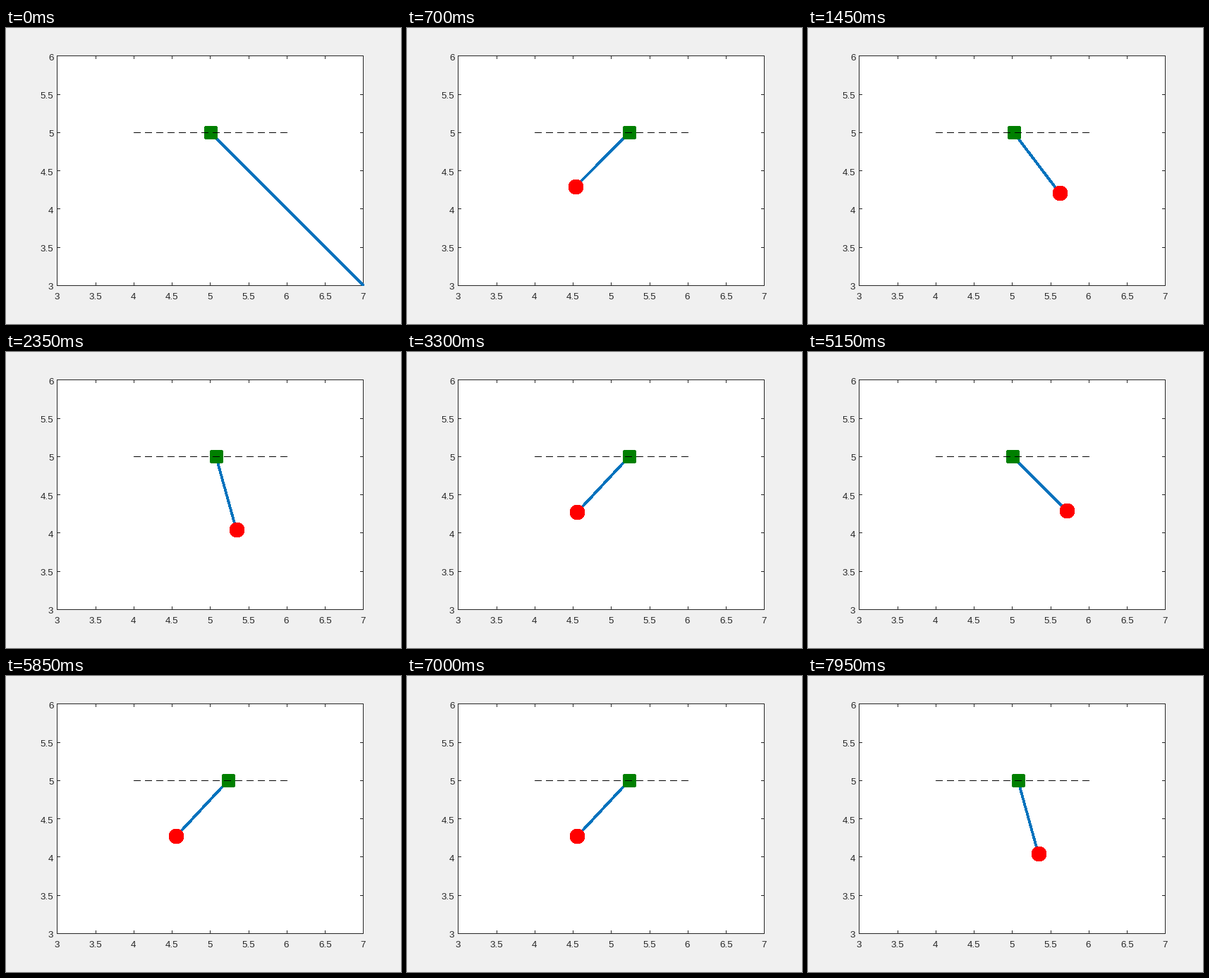
A matplotlib script that plays this animation: 560 by 420 pixels, repeating every 8 s.

```python
import numpy as np
import matplotlib.pyplot as plt
from matplotlib.animation import FuncAnimation
from matplotlib.patches import Circle, Polygon, Rectangle

W, H, DPI = 560, 420, 100
FRAMES, INTERVAL = 160, 50
PX = 72 / DPI                      # one pixel in points
UNIT = 108.5                       # pixels per data unit
LEFT, BOTTOM = 72.8, 365.4         # pixel position of data point (3, 3)
INK = "#262626"
PEN = 2.67

# Pendulum on a free cart, released at rest
MASS_RATIO = 6.0                   # (cart + bob) / bob
START = np.pi / 4
PERIOD = 25.5                      # frames per swing

K = np.sin(START / 2)
PHI = np.linspace(0, 14 * np.pi, 14001)


def angle_at(phi):
    return 2 * np.arcsin(K * np.cos(phi))


rate = np.sqrt((1 - np.cos(angle_at(PHI)) ** 2 / MASS_RATIO)
               / (1 - (K * np.cos(PHI)) ** 2))
clock = np.concatenate(([0], np.cumsum((rate[1:] + rate[:-1]) / 2)))
clock *= 7 * PERIOD / clock[-1]


def to_px(x, y):
    return LEFT + (x - 3) * UNIT, BOTTOM - (y - 3) * UNIT


def marker_px(x, y):
    """Markers sit on whole pixels."""
    px, py = to_px(x, y)
    return np.floor(px + 0.5) + 0.5, np.floor(py) + 0.5


def pose(n):
    theta = angle_at(np.interp(n, clock, PHI))
    cart = 5 + (np.sin(START) - np.sin(theta)) / MASS_RATIO
    return cart, cart + np.sin(theta), 5 - np.cos(theta)


def cut_square(cx, cy, a=7.5, b=9.5):
    pts = [(-a, -b), (a, -b), (b, -a), (b, a),
           (a, b), (-a, b), (-b, a), (-b, -a)]
    return np.array(pts) + (cx, cy)


plt.rcParams["font.family"] = "Liberation Sans"
fig = plt.figure(figsize=(W / DPI, H / DPI), dpi=DPI, facecolor="#f0f0f0")
ax = fig.add_axes([0, 0, 1, 1])
ax.set_xlim(0, W)
ax.set_ylim(H, 0)
ax.axis("off")

X0, X1, Y0, Y1 = 72.5, 506.5, 39.5, 365.5


def stroke(xs, ys, **kw):
    style = dict(color=INK, lw=PX, solid_capstyle="butt", snap=False,
                 zorder=2)
    style.update(kw)
    return ax.plot(xs, ys, **style)[0]


def label(x, y, value, align):
    ax.text(x, y, f"{value:g}", ha=align, va="baseline", color=INK,
            fontsize=13.33 * PX)


ax.add_patch(Rectangle((72, 39), 435, 327, fc="white", ec="none", zorder=0))
stroke([X0, X1, X1, X0, X0], [Y0, Y0, Y1, Y1, Y0],
       solid_joinstyle="miter")

for v in np.arange(3, 7.1, 0.5):
    raw = to_px(v, 3)[0]
    x = np.floor(raw) + 0.5
    stroke([x, x], [Y1, Y1 - 4.5])
    stroke([x, x], [Y0, Y0 + 4.5])
    label(np.round(raw) - 0.5, 385, v, "center")

for v in np.arange(3, 6.1, 0.5):
    raw = to_px(3, v)[1]
    y = np.floor(raw) + 0.5
    stroke([X0, X0 + 4.5], [y, y])
    stroke([X1, X1 - 4.5], [y, y])
    label(67.5, np.round(raw) + 6, v, "right")

rod = stroke([], [], color="#0072bd", lw=PEN * PX, antialiased=False,
             zorder=3)
rod.set_clip_path(Rectangle((72, 39), 436, 327, transform=ax.transData))
bob = Circle((0, 0), 10.5, fc="red", ec="none", zorder=4)
cart_box = Polygon(cut_square(0, 0), fc="#008000", ec="none", zorder=4)
for part in (bob, cart_box):
    part.set(snap=False, antialiased=False)
    ax.add_patch(part)

# Rail, drawn over the cart
for i in range(14):
    stroke([181 + 16 * i, 191 + 16 * i], [148.5, 148.5], color="black",
           zorder=5)


def draw(n):
    if n == 0:
        cart, bx, by = 5, 7, 3
    else:
        cart, bx, by = pose(n - 1)
    rod.set_data(*zip(to_px(cart, 5), to_px(bx, by)))
    cart_box.set_xy(cut_square(*marker_px(cart, 5)))
    bob.center = marker_px(bx, by)
    bob.set_visible(n > 0)
    return rod, bob, cart_box


anim = FuncAnimation(fig, draw, frames=FRAMES, interval=INTERVAL,
                     repeat=True, repeat_delay=0)
plt.show()
```
